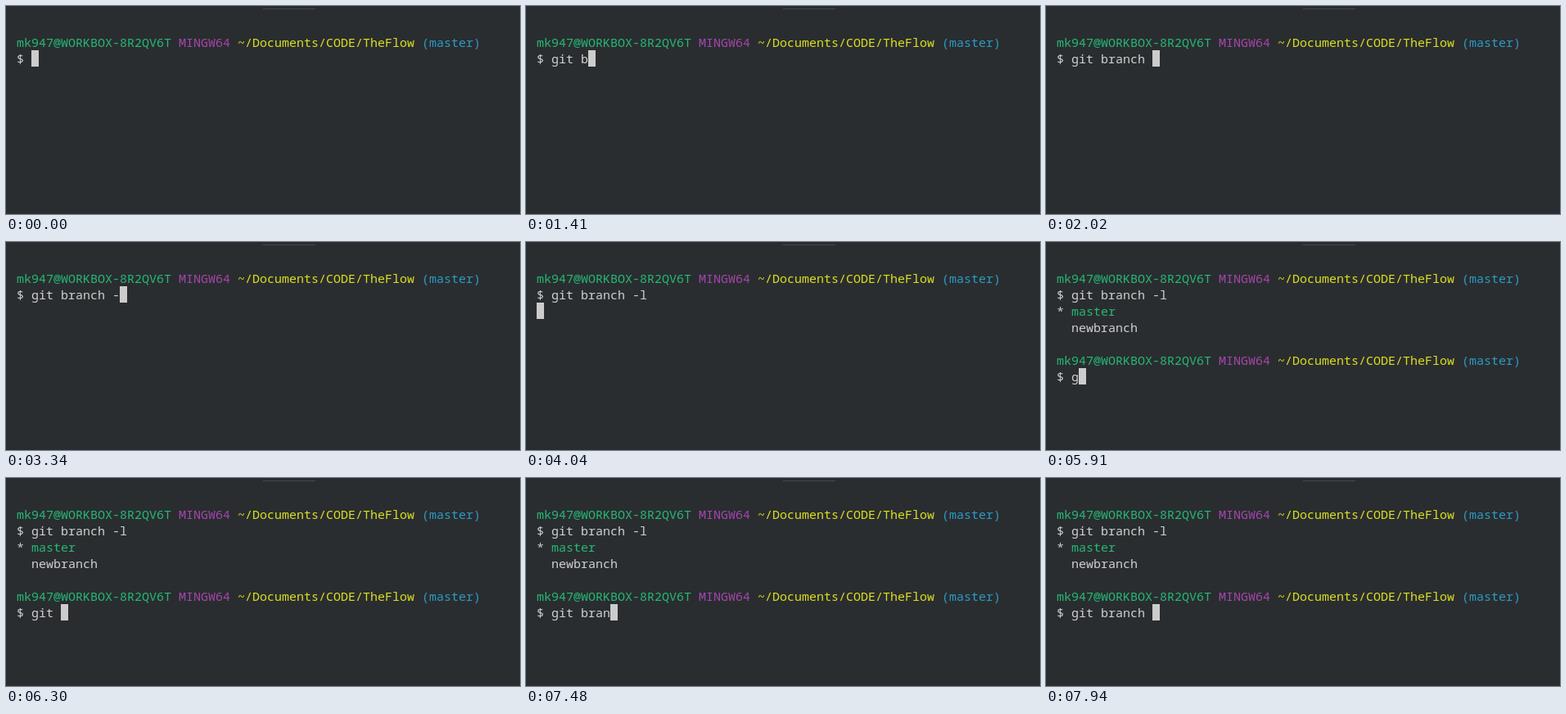
Write an HTML page that moves like this. It is 628 px wide and 254 px high and loops after 8 s.

```html
<!DOCTYPE html>
<html lang="en">
<head>
<meta charset="utf-8">
<title>Terminal: git branch</title>
<style>
  html, body { margin: 0; width: 100%; height: 100%; overflow: hidden; background: #2a2d30; }
  #handle { position: absolute; left: 314px; top: 3px; width: 64px; height: 1px; background: #47494c; }
  #screen {
    position: absolute; left: 13px; top: 34px; margin: 0;
    font: 15px/20px "Noto Sans Mono", "Liberation Mono", monospace;
    font-variant-ligatures: none; color: #d0d0d0;
  }
  #cursor { position: absolute; width: 9px; height: 20px; background: #cccccc; }
  .green { color: #25b975; }
  .purple { color: #a545ae; }
  .yellow { color: #dcdf1e; }
  .blue { color: #2c9bc6; }
</style>
</head>
<body>
<div id="handle"></div>
<pre id="screen"></pre>
<div id="cursor"></div>
<script>
const LOOP = 8000, LEFT = 13, TOP = 34, CELL = 9, ROW = 20;
const ENTER = 4040, OUTPUT = 4120, PROMPT = 4270;

const paint = (color, text) => `<span class="${color}">${text}</span>`;
const prompt = [
  paint("green", "mk947@WORKBOX-8R2QV6T"),
  paint("purple", "MINGW64"),
  paint("yellow", "~/Documents/CODE/TheFlow"),
  paint("blue", "(master)")
].join(" ") + "\n$ ";
const branches = `\n* ${paint("green", "master")}\n  newbranch\n`;

// Each entry is [time in ms, characters typed at that time].
const firstKeys = [
  [550, "g"], [630, "i"], [700, "t"], [780, " "],
  [1410, "b"], [1490, "r"], [1560, "a"], [1640, "n"],
  [1780, "c"], [1950, "h"], [2020, " "], [3340, "-"], [3730, "l"]
];
const secondKeys = [
  [5910, "g"], [6060, "i"], [6150, "t"], [6300, " "],
  [6930, "b"], [7010, "ra"], [7480, "n"], [7620, "c"], [7770, "h"], [7940, " "]
];
const typed = (keys, t) => keys.filter(([at]) => at <= t).map(([, text]) => text).join("");

const screen = document.getElementById("screen");
const cursor = document.getElementById("cursor");
let shown = "";

function draw() {
  const t = performance.now() % LOOP;
  const first = typed(firstKeys, t), second = typed(secondKeys, t);
  let html = prompt + first, row = 1, column = 2 + first.length;
  if (t >= ENTER) { row = 2; column = 0; }
  if (t >= OUTPUT) { html += branches; row = 4; }
  if (t >= PROMPT) { html += "\n" + prompt + second; row = 6; column = 2 + second.length; }

  if (html !== shown) screen.innerHTML = shown = html;
  cursor.style.left = LEFT + column * CELL + "px";
  cursor.style.top = TOP + row * ROW + "px";
  requestAnimationFrame(draw);
}
draw();
</script>
</body>
</html>
```
